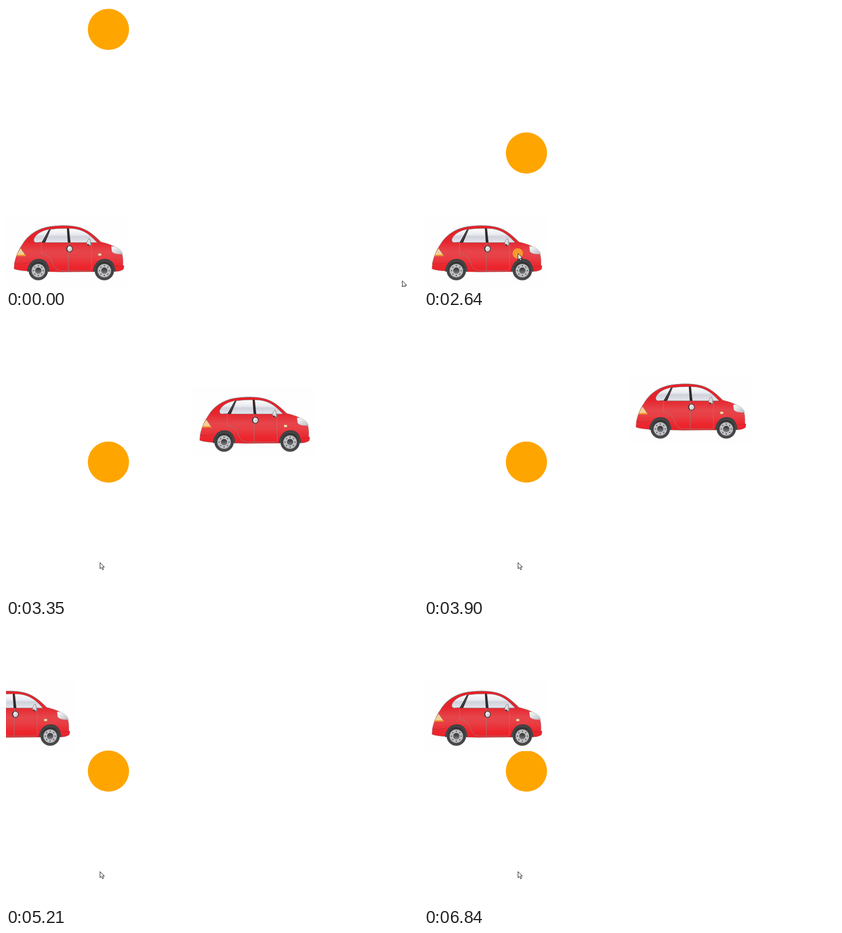
Animation, 905 px wide and 619 px high, one loop 6900 ms. Source, as an HTML page:

```html
<!DOCTYPE html>
<html lang="en">
<head>
<meta charset="utf-8">
<title>Elastic moves</title>
<style>
html, body { margin: 0; width: 100%; height: 100%; overflow: hidden; background: #fff; }
svg { display: block; width: 905px; height: 619px; }
</style>
</head>
<body>
<svg viewBox="0 0 905 619">
  <defs>
    <linearGradient id="paint" x1="0" y1="483" x2="0" y2="587" gradientUnits="userSpaceOnUse">
      <stop offset="0" stop-color="#e91f28"/>
      <stop offset=".34" stop-color="#e5242c"/>
      <stop offset=".56" stop-color="#e6454b"/>
      <stop offset=".68" stop-color="#e83f45"/>
      <stop offset=".86" stop-color="#ed262e"/>
      <stop offset="1" stop-color="#e92028"/>
    </linearGradient>
    <linearGradient id="glass" x1="0" y1="489" x2="0" y2="521" gradientUnits="userSpaceOnUse">
      <stop offset="0" stop-color="#fff"/>
      <stop offset=".45" stop-color="#e9eaf0"/>
      <stop offset=".6" stop-color="#d0d2dc"/>
      <stop offset="1" stop-color="#e4e5ec"/>
    </linearGradient>
    <linearGradient id="chrome" x1="0" y1="0" x2="1" y2="1">
      <stop offset="0" stop-color="#fff"/>
      <stop offset="1" stop-color="#b9bbc2"/>
    </linearGradient>
    <linearGradient id="tyre" x1="0" y1="0" x2="0" y2="1">
      <stop offset="0" stop-color="#333334"/>
      <stop offset="1" stop-color="#4b4b4d"/>
    </linearGradient>
    <linearGradient id="hub" x1="0" y1="0" x2="0" y2="1">
      <stop offset="0" stop-color="#2c2c2e"/>
      <stop offset="1" stop-color="#7d7e82"/>
    </linearGradient>
    <g id="wheel">
      <path d="M-24.500 2C-23-17-12-26 1-26S23-18 24.500 2Z" fill="#424143"/>
      <circle r="21" fill="url(#tyre)" stroke="#5d5d5f" stroke-width=".8"/>
      <circle r="14.800" fill="#bfc0c3" stroke="#8b8b8e"/>
      <circle r="10.800" fill="none" stroke="#3f3f41" stroke-width="2.400" stroke-linecap="round"
        pathLength="80" stroke-dasharray=".1 9.9"/>
      <circle r="7" fill="url(#hub)" stroke="#97989b" stroke-width=".8"/>
    </g>
  </defs>

  <circle id="ball" cx="225" r="45.2" fill="orange"/>

  <g id="car">
    <path d="M0 461H271V616H0Z" fill="#fefefe"/>
    <path d="M17.500 579L18.500 566C22 550 28 536 37 523.500C48 506 66 493 88 487.500C112 482.500 143 482.500 162 488
      C181 494 193 504.500 208 519.500C223 523 239 528.500 248 536.500C256 543 257.500 553 257 571L259.500 573L258 580
      C252 584 246 585 238 585L120 586L48 584C35 583 25 582 17.500 579Z"
      fill="url(#paint)" stroke="#a88585" stroke-width=".8"/>
    <path d="M18 568Q34 570 48 566M242 573L259 573" fill="none" stroke="#b3282e" stroke-width=".8"/>
    <path d="M37 523.500C48 506 66 493 88 487.500C112 482.500 143 482.500 162 488C181 494 193 504.500 208 519.500"
      fill="none" stroke="#8a7e7c" stroke-width="1.100"/>

    <g stroke="#808084" stroke-width=".9" stroke-linejoin="round">
      <path d="M61 515C64 503 78 495 96 491.500L79 520L66 521Q61 520 61 515Z" fill="url(#glass)"/>
      <path d="M86 521L98 492Q115 489.500 134 490L136 521Z" fill="url(#glass)"/>
      <path d="M138.500 490C168 490 184 503 200 521H141.500Z" fill="url(#glass)"/>
    </g>
    <path d="M78.500 521L94 492.500L98 491.500L85.500 521ZM134 489.500H137.500L141.500 521H136Z" fill="#29292b"/>
    <path d="M82 520L96 493" stroke="#888" stroke-width=".7"/>

    <path d="M78 521V546C90 548 97 552 101 562C105 576 111 583 124 583H182Q188 583 188 577
      C186 558 189 541 187.500 521M137 521V583" fill="none" stroke="#91807f" stroke-width="1"/>
    <path d="M177 524Q179 515 183 512.500Q187 518 186.500 528Z" fill="url(#chrome)" stroke="#666" stroke-width=".9"/>
    <path d="M178.500 524.500L182 525L181 530Z" fill="#333"/>
    <circle cx="139.500" cy="535" r="6.700" fill="url(#chrome)" stroke="#453a39" stroke-width="1.500"/>
    <path d="M136 530Q132 535 136 540" fill="none" stroke="#333" stroke-width="1.300"/>

    <path d="M32 533.500L44 551H23Q26 541 32 533.500Z" fill="#f4cf98" stroke="#b0764f" stroke-width=".7"/>
    <path d="M24 548.300H42L44 551H23Z" fill="#f58a1f"/>
    <path d="M231.500 529.500C244 529 253 537 256.500 546C247 547 235 546 232.500 540Z"
      fill="url(#chrome)" stroke="#bbb" stroke-width=".8"/>
    <rect x="202.500" y="545" width="7" height="5" rx="1.500" fill="#f8e2b4" stroke="#c08a5b" stroke-width=".9"/>
    <use href="#wheel" x="71" y="583"/>
    <use href="#wheel" x="216" y="583"/>
  </g>

  <circle id="tap" r="11.300" fill="#fba428" fill-opacity=".88"/>
  <path id="arrow" d="M.5.5V14L3.600 11L6 16.300L8.300 15.200L6 10.200H10.200Z" fill="#fff" stroke="#000"/>
</svg>
<script>
const LOOP = 6900;
const [ball, car, tap, arrow] = ['ball', 'car', 'tap', 'arrow'].map(id => document.getElementById(id));

// Rows are [time, value, value...]
const pointer = [
  [30, 870, 605], [150, 730, 430], [260, 470, 170], [350, 285, 62], [410, 225, 58], [480, 205, 88],
  [1370, 205, 88], [1430, 205, 99], [1800, 205, 300], [2170, 206, 497], [2400, 206, 545]
];
const drop = [[742, 0], [2742, 1]];
const launch = [[2746, 0], [2920, .087], [3350, .317], [4746, 1]];
const comeBack = [[4845, 0], [5000, .078], [5810, .448], [6845, 1]];
const taps = [[470, 600], [2530, 2700]];

function at(rows, t) {
  if (t <= rows[0][0]) return rows[0].slice(1);
  const i = rows.findIndex(row => row[0] > t);
  if (i < 0) return rows[rows.length - 1].slice(1);
  const a = rows[i - 1], b = rows[i];
  const k = (t - a[0]) / (b[0] - a[0]);
  return a.slice(1).map((v, j) => v + (b[j + 1] - v) * k);
}

function elastic(p) {
  if (p <= 0 || p >= 1) return p <= 0 ? 0 : 1;
  return 1 + 2 ** (-10 * p) * Math.sin((p - .075) * 2 * Math.PI / .3);
}

const spring = (rows, t) => elastic(at(rows, t)[0]);
// Whole pixels keep the thin lines sharp.
const move = (el, x, y) => el.setAttribute('transform', `translate(${Math.round(x)} ${Math.round(y)})`);

function draw(t) {
  ball.setAttribute('cy', 51.5 + 272.5 * spring(drop, t));
  const out = spring(launch, t), back = spring(comeBack, t);
  move(car, 455 * (out - back), -337.6 * out + 1.6 * back);
  const [x, y] = at(pointer, t);
  move(arrow, x, y);
  move(tap, x, y);
  tap.style.display = taps.some(([a, b]) => t >= a && t < b) ? '' : 'none';
}

const start = performance.now();
function tick() {
  draw((performance.now() - start) % LOOP);
  requestAnimationFrame(tick);
}
tick();
</script>
</body>
</html>
```
